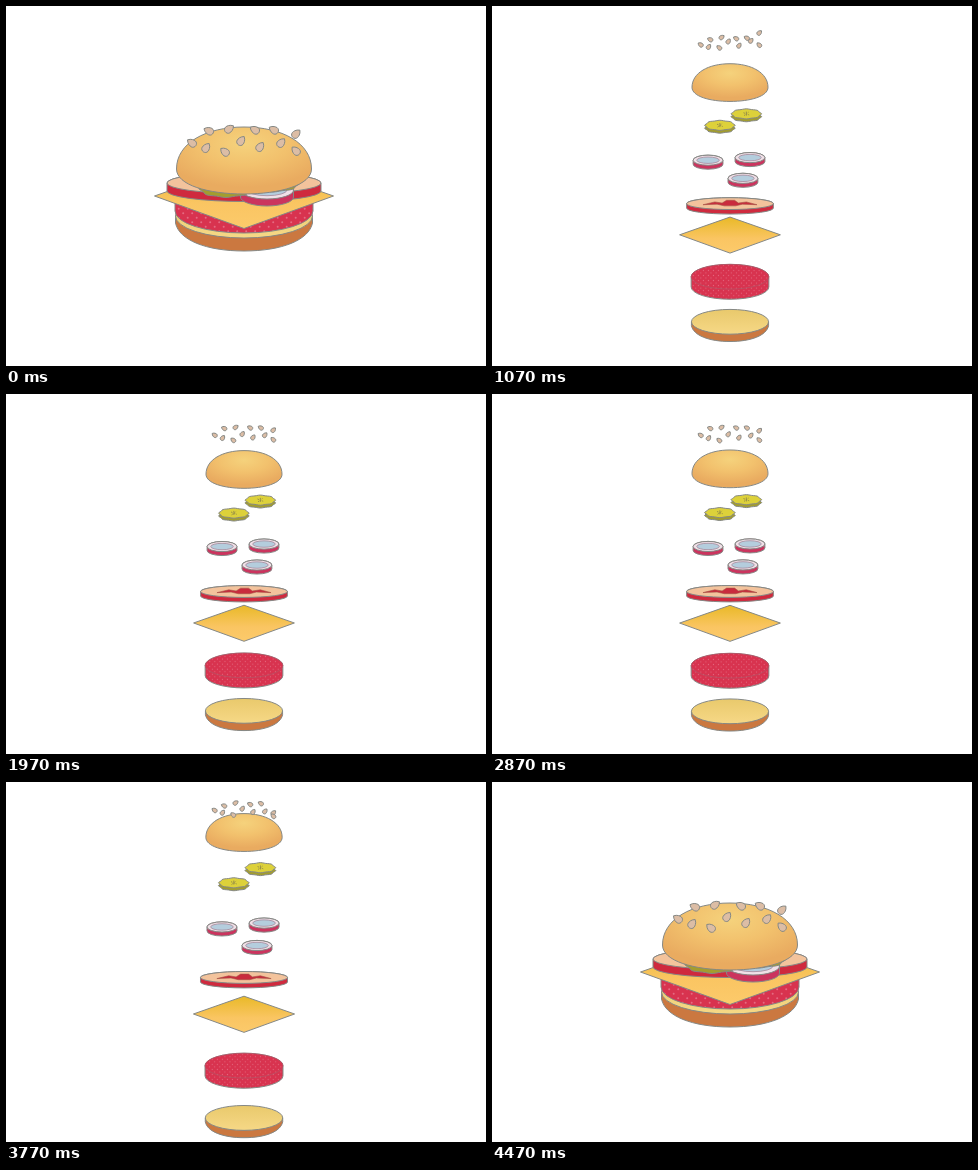
These frames come from a looping animation (480x360 px, 4630 ms). An HTML page:

```html
<!DOCTYPE html>
<html lang="en">
<head>
<meta charset="utf-8">
<title>Burger</title>
<style>
  html, body { margin: 0; width: 100%; height: 100%; overflow: hidden; background: #fff; }
  svg { display: block; width: 100vw; height: 100vh; }
  .line { stroke: #858885; stroke-width: 1; stroke-linejoin: round; }
  .line, .thin { vector-effect: non-scaling-stroke; }
</style>
</head>
<body>
<svg id="stage" viewBox="0 0 480 360">
  <defs>
    <radialGradient id="crust" cx=".5" cy=".25" r=".65">
      <stop offset="0" stop-color="#f5d27c"/>
      <stop offset=".5" stop-color="#f2c16d"/>
      <stop offset="1" stop-color="#e9ab60"/>
    </radialGradient>
    <linearGradient id="crumb" x2="0" y2="1">
      <stop offset="0" stop-color="#e9c96c"/>
      <stop offset="1" stop-color="#f6d886"/>
    </linearGradient>
    <linearGradient id="cheese" x2="0" y2="1">
      <stop offset="0" stop-color="#e9b927"/>
      <stop offset=".6" stop-color="#fac562"/>
      <stop offset="1" stop-color="#fcca6b"/>
    </linearGradient>
    <pattern id="meat" width="9" height="9" patternUnits="userSpaceOnUse">
      <rect width="9" height="9" fill="#d8334f"/>
      <circle cx="2.2" cy="2.2" r="1" fill="#e56a81"/>
      <circle cx="6.7" cy="6.7" r="1" fill="#e56a81"/>
    </pattern>
  </defs>
</svg>
<script>
const stage = document.getElementById('stage');
const CENTER_X = 238, BASE_Y = 245, OPEN_SCALE = 0.563;
const LOOP = 4630, FIRST_MOVE = 130, CLOSING = 2630, FPMS = 0.03, LAST_POSE = 55;
const SEED_RISE = 254;
const parts = [];

// Steady travel to the goal, then a damped swing around it.
function swing(start, hit) {
  return t => {
    if (t < hit) return Math.max(0, (t - start) / (hit - start));
    const s = (t - hit) / 1000;
    return 1 + 0.4 * Math.exp(-4.27 * s) * Math.sin(8.32 * s);
  };
}

function elastic(start, duration, period) {
  return t => {
    const p = (t - start) / duration;
    if (p <= 0) return 0;
    if (p >= 1) return 1;
    return 1 + 2 ** (-10 * p) * Math.sin((p - period / 4) * 2 * Math.PI / period);
  };
}

function expoOut(t, start, duration) {
  const p = (t - start) / duration;
  return p <= 0 ? 0 : p >= 1 ? 1 : 1 - 2 ** (-10 * p);
}

const path = (d, fill, extra = 'class="line"') => `<path d="${d}" fill="${fill}" ${extra}/>`;
const ellipse = (rx, ry, fill, extra = 'class="line"') =>
  `<ellipse rx="${rx}" ry="${ry}" fill="${fill}" ${extra}/>`;

// An upright disc: side wall below a flat top.
function disc(rx, ry, depth, side, top, rim) {
  const wall = `M${-rx} 0V${depth}A${rx} ${ry} 0 0 0 ${rx} ${depth}V0A${rx} ${ry} 0 0 0 ${-rx} 0Z`;
  return path(wall, side) + ellipse(rx, ry, top, rim);
}

function scallop(rx, ry, drop) {
  const points = Array.from({ length: 48 }, (_, i) => {
    const a = i * Math.PI / 24, k = 1 + 0.045 * Math.cos(8 * a);
    return (rx * k * Math.cos(a)).toFixed(1) + ' ' + (ry * k * Math.sin(a) + drop).toFixed(1);
  });
  return 'M' + points.join('L') + 'Z';
}

function addPart(art, x, y, rise, ease) {
  const node = document.createElementNS('http://www.w3.org/2000/svg', 'g');
  node.innerHTML = art;
  stage.append(node);
  parts.push({ node, x, y, rise, ease });
}

function addLayer(art, x, closedY, openY, start = 445, hit = 664) {
  const rise = (openY - BASE_Y) / OPEN_SCALE - (closedY - BASE_Y);
  addPart(art, x, closedY, rise, swing(start, hit));
}

const bottomBun =
  path('M-68.5 0V7C-65 24 -38 35 0 35C38 35 65 24 68.5 7V0Z', '#cb7840') +
  ellipse(68.5, 22, 'url(#crumb)');

const patty = disc(69, 22, 18, 'url(#meat)', 'url(#meat)',
  'class="thin" stroke="#b05668" stroke-width=".7"');

const cheese = path('M-89.5 0L0 -31.5L89.5 0L0 32.5Z', 'url(#cheese)');

const tomato = disc(77, 10.5, 8, '#cf2a3e', '#f3c39c') +
  path('M-48 2L-27 -3L-14 -1L-6 -6L8 -6L15 -1L29 -3L48 2L22 1L10 4L-10 4L-23 1Z', '#c92b3d',
    'class="thin" stroke="#a55245" stroke-width=".6"');

const onion = disc(26.5, 9, 7, '#cb345e', '#f0e0e7') +
  ellipse(20, 5.7, '#b4cddd', 'class="thin" stroke="#a5899b" stroke-width=".8"');

const pickle = path(scallop(26, 8.6, 5), '#a39d2e') + path(scallop(26, 8.6, 0), '#ddd13a') +
  path('M-5 -2L5 2M-4 3L4 -3M0 -4V4', 'none',
    'class="thin" stroke="#968d48" stroke-width="1" stroke-dasharray="1.5 1"');

const topBun = path('M-67.5 9C-67.5 -17 -38 -33 0 -33C38 -33 67.5 -17 67.5 9' +
  'C67.5 25 36 34 0 34C-36 34 -67.5 25 -67.5 9Z', 'url(#crust)');

const seed = angle => path('M-5.5 0C-3 -3.4 0 -3.6 1.5 -3.6C5.7 -3.2 5.7 3.2 1.5 3.6C0 3.6 -3 3.4 -5.5 0Z',
  '#dcbda5', `class="line" transform="rotate(${angle})"`);

addLayer(bottomBun, 0, 210, 317);
addLayer(patty, 0, 187, 271.5);
addLayer(cheese, 0, 190, 229);
addLayer(tomato, 0, 177, 197.5);
addLayer(onion, -39, 160, 152.5, 375, 587);
addLayer(onion, 35.5, 160, 150, 412, 611);
addLayer(onion, 23, 184, 171, 510, 612);
addLayer(pickle, 29, 172, 106, 517, 652);
addLayer(pickle, -18, 177.5, 119, 535, 680);
addLayer(topBun, 0, 154, 75, 452, 668);

// x, y, angle, start time
[
  [-35, 125, 25, 217], [-15, 123, 145, 268], [11, 124, 30, 240], [30, 124, 30, 265],
  [52, 128, 135, 470], [-52, 137, 35, 287], [-38, 142, 125, 310], [-19, 146, 40, 352],
  [-3, 135, 125, 355], [16, 141, 125, 332], [37, 137, 130, 401], [52, 145, 45, 407]
].forEach(([x, y, angle, start]) => addPart(seed(angle), x, y, -SEED_RISE, elastic(start, 1500, 0.8)));

// The motion runs at 30 poses a second and plays backwards to close.
function poseTime(t) {
  const step = from => Math.floor((t - from) * FPMS + 1e-6);
  const pose = t < FIRST_MOVE ? -1
    : t < CLOSING ? Math.min(step(FIRST_MOVE), LAST_POSE)
    : Math.max(LAST_POSE - 1 - step(CLOSING), -1);
  return pose < 0 ? 0 : FIRST_MOVE + pose / FPMS;
}

function draw(t) {
  const time = poseTime(t);
  const scale = 1 - (1 - OPEN_SCALE) * expoOut(time, 356, 570);
  for (const { node, x, y, rise, ease } of parts) {
    const left = CENTER_X + scale * x;
    const top = BASE_Y + scale * (y - BASE_Y + rise * ease(time));
    node.setAttribute('transform', `translate(${left.toFixed(2)} ${top.toFixed(2)}) scale(${scale.toFixed(4)})`);
  }
}

const origin = performance.now();
function tick() {
  draw((performance.now() - origin) % LOOP);
  requestAnimationFrame(tick);
}
tick();
</script>
</body>
</html>
```
